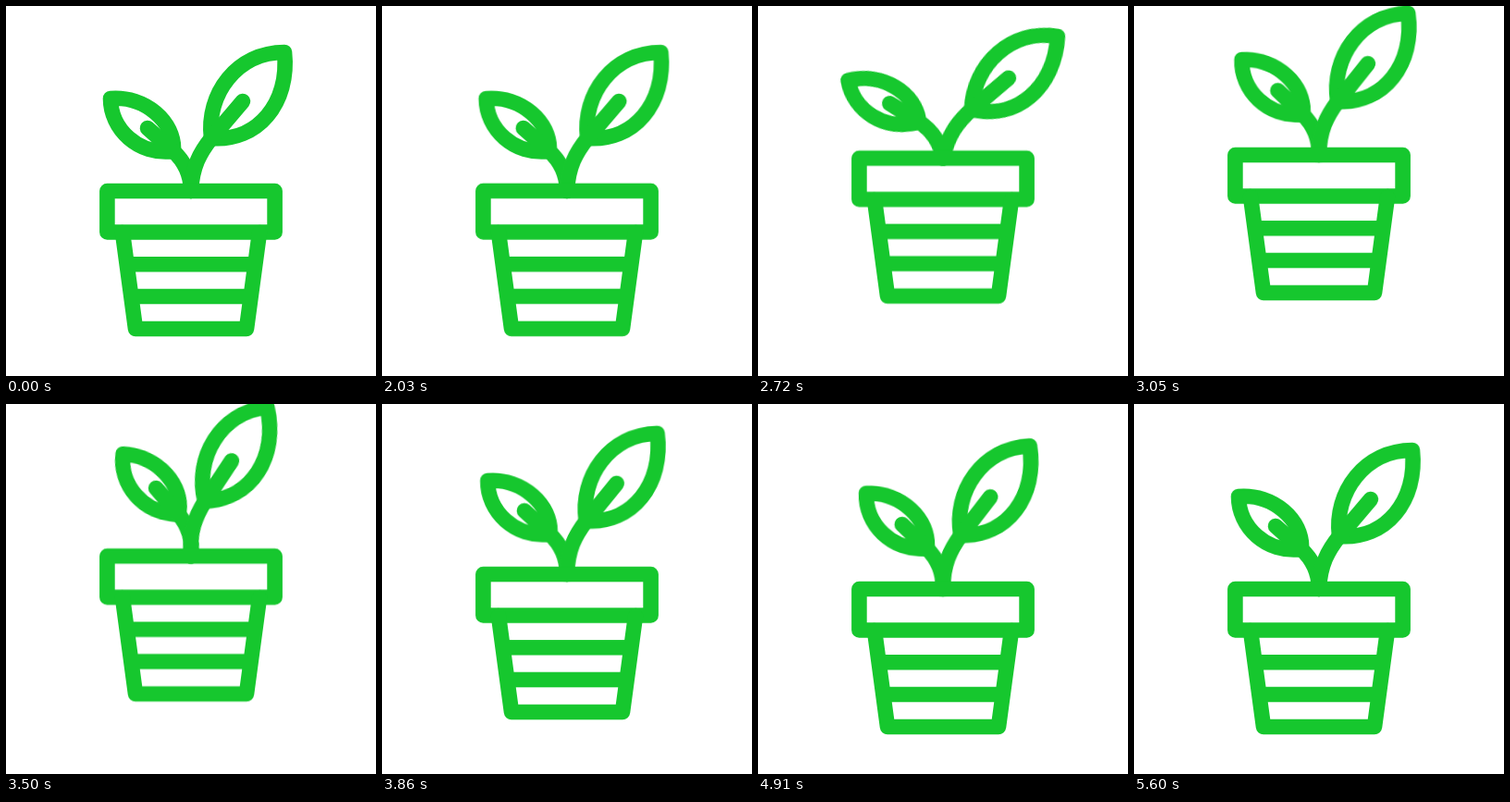
These frames come from a looping animation (400x400 px, 5.63 s). An HTML page:

```html
<!DOCTYPE html>
<html lang="en">
<head>
<meta charset="utf-8">
<title>Potted plant</title>
<style>
  html, body { margin: 0; width: 100%; height: 100%; overflow: hidden; background: #fff; }
  svg { display: block; width: 100vw; height: 100vh; }
  .plant {
    fill: none;
    stroke: #16c72e;
    stroke-width: 16.6;
    stroke-linecap: round;
    stroke-linejoin: round;
    animation: hop 5630ms infinite;
  }
  .sprout { transform-origin: 200px 200px; }
  .left { animation: sway-left 5630ms infinite; }
  .right { animation: sway-right 5630ms infinite; }

  @keyframes hop {
    0%, 35.524% { transform: translateY(0); animation-timing-function: cubic-bezier(.25, 0, .17, 1); }
    56.306% { transform: translateY(-39.2px); animation-timing-function: linear; }
    56.838% { transform: translateY(-39.2px); animation-timing-function: cubic-bezier(.59, 0, .56, 1); }
    76.377%, 100% { transform: translateY(0); }
  }
  @keyframes sway-right {
    0%, 35.524% { transform: rotate(0deg); animation-timing-function: cubic-bezier(.333, 0, .667, 1); }
    44.05% { transform: rotate(14.7deg); animation-timing-function: cubic-bezier(.24, 0, .5, 1); }
    61.279% { transform: rotate(-7deg); animation-timing-function: cubic-bezier(.44, 0, .84, 1); }
    77.62% { transform: rotate(12.5deg); animation-timing-function: cubic-bezier(.333, 0, .667, 1); }
    90.231% { transform: rotate(-5.3deg); animation-timing-function: cubic-bezier(.333, 0, .667, 1); }
    100% { transform: rotate(0deg); }
  }
  @keyframes sway-left {
    0%, 35.524% { transform: rotate(0deg); animation-timing-function: cubic-bezier(.333, 0, .667, 1); }
    44.05% { transform: rotate(-15.3deg); animation-timing-function: cubic-bezier(.24, 0, .5, 1); }
    61.279% { transform: rotate(7.5deg); animation-timing-function: cubic-bezier(.44, 0, .84, 1); }
    77.62% { transform: rotate(-15.6deg); animation-timing-function: cubic-bezier(.333, 0, .667, 1); }
    90.231% { transform: rotate(5.3deg); animation-timing-function: cubic-bezier(.333, 0, .667, 1); }
    100% { transform: rotate(0deg); }
  }
</style>
</head>
<body>
<svg viewBox="0 0 400 400">
  <g class="plant">
    <g class="sprout left">
      <path d="M113 100C150 97 183 125 181 157C143 162 113 133 113 100Z"/>
      <path d="M153 132L180 156C192 167 200 181 200 200"/>
    </g>
    <g class="sprout right">
      <path d="M222 143C216 95 250 50 301 50C307 105 272 147 222 143Z"/>
      <path d="M256 103L222 143C210 158 201 174 200 200"/>
    </g>
    <path d="M109.4 200H290.6V244.5H109.4Z"/>
    <path d="M126 245L140 349H260L274 245M131 279.2H269M136 314H264"/>
  </g>
</svg>
</body>
</html>
```
